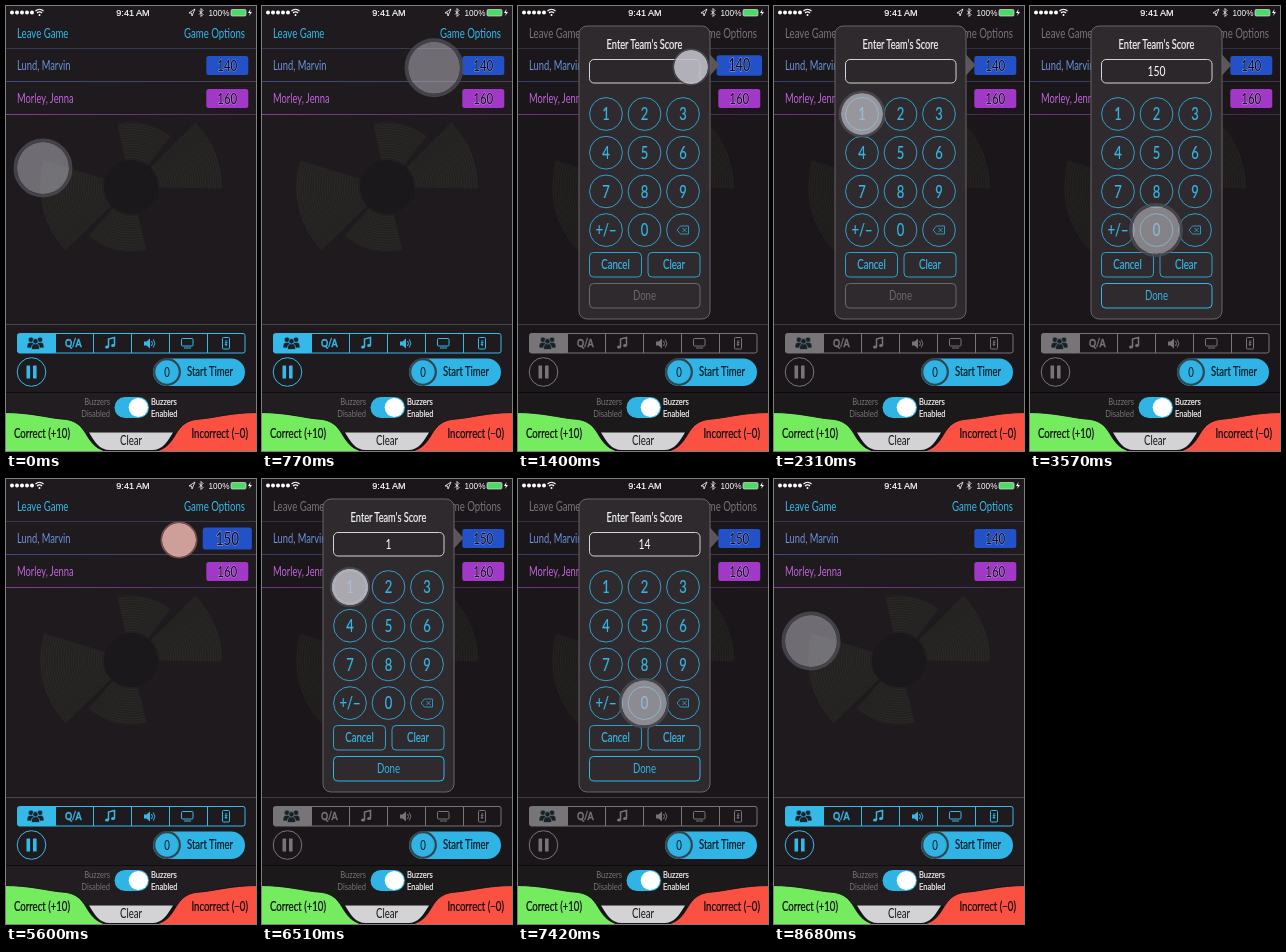
Recreate the animation shown at these times as an HTML page. Size 250 by 445 pixels, loop 8750 ms.

```html
<!DOCTYPE html>
<html lang="en">
<head>
<meta charset="utf-8">
<style>
html, body { margin: 0; width: 100%; height: 100%; overflow: hidden; background: #1e1a1e; }
svg { display: block; width: 100vw; height: 100vh; }
text { font-family: Lato, "Open Sans", sans-serif; }
.tint { fill: var(--tint); }
.line { fill: none; stroke: var(--tint); }
.blue { fill: #35b5e5; }
.edge { fill: none; stroke: #329fca; }
.medium { stroke: currentColor; stroke-width: .25; }
.bar { font-family: "Liberation Sans", Arial, sans-serif; fill: #fff; }
</style>
</head>
<body>
<svg id="stage" viewBox="0 0 250 445" preserveAspectRatio="none"></svg>
<script>
const LOOP = 8750;
const stage = document.getElementById('stage');
const CONDENSED = 0.74;

const label = (s, x, y, size, attrs = '', anchor = 'start') =>
  `<text transform="translate(${x} ${y}) scale(${CONDENSED} 1)" font-size="${size}" text-anchor="${anchor}" ${attrs}>${s}</text>`;
const rect = (x, y, w, h, r, attrs) =>
  `<rect x="${x}" y="${y}" width="${w}" height="${h}" rx="${r}" ${attrs}/>`;
const circle = (x, y, r, attrs) => `<circle cx="${x}" cy="${y}" r="${r}" ${attrs}/>`;
const path = (d, attrs) => `<path d="${d}" ${attrs}/>`;

function statusBar() {
  let out = '';
  for (let i = 0; i < 5; i++) out += circle(6 + i * 5, 6.5, 2, 'fill="#fff"');
  out += path('M29.5 5a6 6 0 0 1 8 0M31 7a3.5 3.5 0 0 1 5 0', 'fill="none" stroke="#fff" stroke-width="1.2"');
  out += circle(33.5, 9, 1, 'fill="#fff"');
  out += '<text class="bar" x="127" y="10" font-size="9.1" text-anchor="middle" stroke="#fff" stroke-width=".2">9:41 AM</text>';
  out += path('M183 7l6-4-3 7-.5-3z', 'fill="none" stroke="#fff" stroke-width=".8"');
  out += path('M193 4.5l4 4-2 2v-8l2 2-4 4', 'fill="none" stroke="#fff" stroke-width=".8"');
  out += '<text class="bar" x="202.5" y="10" font-size="8.2">100%</text>';
  out += rect(225, 3.5, 15, 6.5, 1.2, 'fill="#4cd964" stroke="#ddd" stroke-width=".7"');
  return out + path('M244.5 3l-2.5 4h2l-1 3 3-4h-2z', 'fill="#fff"');
}

function sector(radius, from, to) {
  const at = (r, deg) => {
    const a = deg * Math.PI / 180;
    return `${(125 + r * Math.cos(a)).toFixed(1)} ${(181 + r * Math.sin(a)).toFixed(1)}`;
  };
  let stripes = '';
  for (let r = 30; r < radius; r += 2.5) stripes += `M${at(r, from)}A${r} ${r} 0 0 1 ${at(r, to)}`;
  return path(`M${at(27, from)}L${at(radius, from)}A${radius} ${radius} 0 0 1 ${at(radius, to)}L${at(27, to)}A27 27 0 0 0 ${at(27, from)}`, 'fill="#232120"') +
    path(stripes, 'fill="none" stroke="#302d2d" stroke-width=".7"');
}

function team(name, y, color, box, id) {
  return label(name, 11, y + 4.5, 12.6, `fill="${color}"`) +
    `<g id="${id}" transform="translate(221.3 ${y})">` +
    rect(-21, -9.5, 42, 19, 2.5, `fill="${box}"`) +
    label(id === 'first' ? '<tspan id="score"></tspan>' : '160', 0, 5.5, 15.5,
      'fill="#0b0910" stroke="#ffffff" stroke-opacity=".4" stroke-width="1.2" paint-order="stroke"', 'middle') + '</g>';
}

function person(x, y) {
  const ink = 'fill="#16222a" stroke="var(--tint)" stroke-width=".7"';
  return path(`M${x - 4} ${y + 11}q-.5-6 4-6t4 6z`, ink) + circle(x, y + 2.8, 2.7, ink);
}

function tabs() {
  let out = rect(11.5, 327.5, 38, 19.5, 2, 'class="tint"') +
    rect(11.5, 327.5, 227.5, 19.5, 2, 'class="line"');
  for (let i = 1; i < 6; i++) out += path(`M${11.5 + i * 38} 327.5v19.5`, 'class="line"');
  out += person(25, 331) + person(34, 331) + person(29.5, 332.5);
  out += label('Q/A', 67.3, 341, 12, 'class="tint" font-weight="700" stroke="var(--tint)" stroke-width=".4"', 'middle');
  out += path('M102.5 341v-8l6-1.5v8', 'class="line" stroke-width="1.5"') +
    '<ellipse class="tint" cx="101" cy="341" rx="2" ry="1.6"/><ellipse class="tint" cx="107" cy="339.5" rx="2" ry="1.6"/>';
  out += path('M138 335.5h2.5l3.5-3v10l-3.5-3H138z', 'class="tint"') +
    path('M145.5 335q2 2.5 0 5M147.3 333.5q3 4 0 8', 'class="line"');
  out += rect(175.5, 332.5, 11.5, 7.5, 1, 'class="line"') + path('M178 342h7', 'class="line"');
  return out + rect(216.5, 331.5, 7, 11.5, 1, 'class="line"') +
    label('#', 220, 340.3, 7.5, 'class="tint" font-weight="700"', 'middle');
}

function controls() {
  return circle(25.5, 366, 14.3, 'class="line"') +
    rect(20.5, 359.5, 3.6, 13, .5, 'class="tint"') + rect(27, 359.5, 3.6, 13, .5, 'class="tint"') +
    rect(147, 352.5, 92, 27.5, 13.75, 'fill="#30b3e5"') +
    circle(161, 366, 12.8, 'fill="#30b3e5" stroke="#34444d" stroke-width="2.2"') +
    label('0', 161, 370.5, 13, 'fill="#101820"', 'middle') +
    label('Start Timer', 181, 370.3, 12.8, 'fill="#0d1a20" class="medium" color="#0d1a20"') +
    label('Buzzers', 104, 399, 10.2, 'fill="#777376"', 'end') +
    label('Disabled', 104, 411, 10.2, 'fill="#777376"', 'end') +
    label('Buzzers', 145, 399, 10.2, 'fill="#eee" class="medium" color="#eee"') +
    label('Enabled', 145, 411, 10.2, 'fill="#eee" class="medium" color="#eee"') +
    rect(108.5, 391, 34.5, 21, 10.5, 'fill="#30b3e5"') + circle(132.3, 401.5, 9.6, 'fill="#fff"');
}

function answerBar() {
  const side = 'M-2 406.500C25 406.500 42 412 56 413C75 414 78 426 84 434C89 441 94 444 103 446H-2Z';
  const ink = 'fill="#100c0e" class="medium" color="#100c0e"';
  return path('M80 426.500H170L160 446H90Z', 'fill="#151215"') +
    path('M83 426.500H167C161 436 157 444 146 444H104C93 444 89 436 83 426.500Z', 'fill="#d3d2d5"') +
    path(side, 'fill="#75ec60" stroke="#151215"') +
    path(side, 'transform="translate(250 0) scale(-1 1)" fill="#fa5143" stroke="#151215"') +
    label('Correct (+10)', 8, 431.5, 13, ink) +
    label('Incorrect (−0)', 242, 431.5, 13, ink, 'end') +
    label('Clear', 125, 438.5, 13, 'fill="#161316"', 'middle');
}

function keypad() {
  let out = path('M192 48.5l9.500 10.500-9.500 10.500z', 'fill="#5a575a"') +
    rect(61, 20, 131, 293, 8, 'fill="#2e2a2d" stroke="#686568"') +
    label("Enter Team's Score", 126.5, 42.5, 12.5, 'fill="#f2f2f2" class="medium" color="#f2f2f2"', 'middle') +
    rect(71.5, 53.5, 110.5, 23.5, 4.5, 'fill="#2b272a" stroke="#d4d4d4"') +
    label('<tspan id="entry"></tspan>', 126.5, 70, 14, 'fill="#fff"', 'middle');
  ['1', '2', '3', '4', '5', '6', '7', '8', '9', '+/−', '0', ''].forEach((key, i) => {
    const x = 88 + (i % 3) * 38.5, y = 108 + Math.floor(i / 3) * 38.7;
    out += circle(x, y, 16.4, 'class="edge"') +
      label(key, x, y + 6.2, 17.5, 'class="blue medium" color="#35b5e5"', 'middle');
  });
  out += path('M159 224l3.5-4h8v8h-8zM164.5 222l4 4m0-4l-4 4', 'class="edge" stroke-width=".9"');
  for (const [name, x] of [['Cancel', 71.5], ['Clear', 130]])
    out += rect(x, 246.5, 52, 24.5, 4, 'class="edge"') +
      label(name, x + 26, 263, 13, 'class="blue medium" color="#35b5e5"', 'middle');
  return out + '<g id="done">' + rect(71.5, 277.5, 110.5, 24.5, 4, 'fill="none" stroke="currentColor"') +
    label('Done', 126.5, 294.3, 13, 'fill="currentColor"', 'middle') + '</g>';
}

stage.innerHTML = `
  <defs>
    <linearGradient id="violet"><stop stop-color="#87389c"/><stop offset="1" stop-color="#4a3350"/></linearGradient>
    <linearGradient id="indigo"><stop stop-color="#3c4a80"/><stop offset="1" stop-color="#454247"/></linearGradient>
  </defs>
  ${rect(0, 0, 250, 445, 0, 'fill="#1e1a1e"')}
  ${sector(91, -45, 1)}${sector(91, 136, 197)}${sector(65, -102, -52)}${sector(65, 76, 131)}
  ${circle(125, 181, 27, 'fill="#1b181b"')}
  ${rect(0, 387, 250, 58, 0, 'fill="#211d20"')}
  ${path('M0 42.5H250', 'stroke="#343b50"')}
  ${rect(0, 75, 250, 1, 0, 'fill="url(#indigo)"')}${rect(0, 108, 250, 1, 0, 'fill="url(#violet)"')}
  ${path('M0 318.5H250', 'stroke="#4a474b"')}${path('M0 386.5H250', 'stroke="#0e0c0e"')}
  <rect id="shade" width="250" height="445"/>
  ${label('Leave Game', 11, 32, 13, 'class="tint"')}
  ${label('Game Options', 239, 32, 13, 'class="tint"', 'end')}
  ${tabs()}${controls()}
  ${statusBar()}
  ${team('Lund, Marvin', 59.5, '#6b93dc', '#2351c8', 'first')}
  ${team('Morley, Jenna', 92.5, '#c064dc', '#a238c8', 'second')}
  ${answerBar()}
  <g id="pad">${keypad()}</g>
  <circle id="touch"/><circle id="ring" fill="none"/>`;

const $ = id => document.getElementById(id);
const [shade, pad, touch, ring, first, score, entry, done] =
  ['shade', 'pad', 'touch', 'ring', 'first', 'score', 'entry', 'done'].map($);

// time, x, y, pressure
const moves = [
  [0, 37, 162, 0], [210, 37, 162, 0], [800, 173, 61, 0], [980, 173, 61, 1], [1420, 173, 61, 1],
  [1600, 173, 61, 0], [2150, 88, 108, 0], [2450, 88, 108, 1], [2600, 88, 108, 0],
  [2800, 126, 147, 0], [2940, 126, 147, 1], [3080, 126, 147, 0],
  [3300, 126, 224, 0], [3440, 126, 224, 1], [3630, 126, 224, 0],
  [4000, 126, 289, 0], [4200, 126, 289, 1], [4420, 126, 289, 0],
  [5050, 173, 61, 0], [5260, 173, 61, 1], [5780, 173, 61, 1], [5950, 173, 61, 0],
  [6350, 88, 108, 0], [6480, 88, 108, 1], [6610, 88, 108, 0],
  [6800, 88, 147, 0], [6930, 88, 147, 1], [7060, 88, 147, 0],
  [7350, 126, 224, 0], [7520, 126, 224, 1], [7650, 126, 224, 0],
  [7950, 126, 289, 0], [8120, 126, 289, 1], [8250, 126, 289, 1], [8670, 37, 162, 0], [LOOP, 37, 162, 0]
];
const entries = [[0, ''], [2450, '1'], [2960, '15'], [3460, '150'], [4700, ''], [6500, '1'], [6950, '14'], [7500, '140']];

const ease = (a, b, t) => {
  const k = Math.min(1, Math.max(0, (t - a) / (b - a)));
  return k * k * (3 - 2 * k);
};
const mix = (a, b, k) => `rgb(${a.map((v, i) => Math.round(v + (b[i] - v) * k))})`;
const set = (node, attrs) => {
  for (const name in attrs) node.setAttribute(name, attrs[name]);
};

function render(t) {
  const i = moves.findIndex(m => m[0] > t);
  const from = moves[i - 1], to = moves[i];
  const k = ease(from[0], to[0], t);
  const [, x, y, press] = from.map((v, n) => v + (to[n] - v) * k);

  const open = ease(1120, 1340, t) - ease(4430, 4650, t) + ease(5680, 5900, t) - ease(8260, 8480, t);
  const grow = ease(920, 1080, t) - ease(1300, 1500, t) + ease(5200, 5380, t) - ease(5750, 5950, t);
  const flush = ease(950, 1080, t) - ease(1120, 1300, t) + ease(5230, 5400, t) - ease(5680, 5860, t);

  const radius = 29.5 - 11 * press;
  const border = 3.5 - 2 * press;
  set(touch, {
    cx: x, cy: y, r: radius - border,
    fill: mix([192, 191, 200], [225, 172, 166], flush), 'fill-opacity': .5 + .4 * press
  });
  set(ring, {
    cx: x, cy: y, r: radius - border / 2, 'stroke-width': border,
    stroke: mix([78, 77, 84], [145, 92, 88], flush), 'stroke-opacity': .8
  });

  stage.style.setProperty('--tint', mix([53, 185, 233], [119, 117, 120], open));
  set(shade, { opacity: .15 * open });
  const zoom = 1.08 - .08 * open;
  set(pad, { opacity: open, transform: `translate(126.5 166.5) scale(${zoom}) translate(-126.5 -166.5)` });
  set(first, { transform: `translate(221.3 59.5) scale(${1 + .17 * grow})` });

  score.textContent = t >= 4430 && t < 8260 ? '150' : '140';
  entry.textContent = entries.filter(e => e[0] <= t).pop()[1];
  set(done, { color: entry.textContent ? '#35b5e5' : '#6b686b' });
}

const start = performance.now();
function tick() {
  render((performance.now() - start) % LOOP);
  requestAnimationFrame(tick);
}
tick();
</script>
</body>
</html>
```
